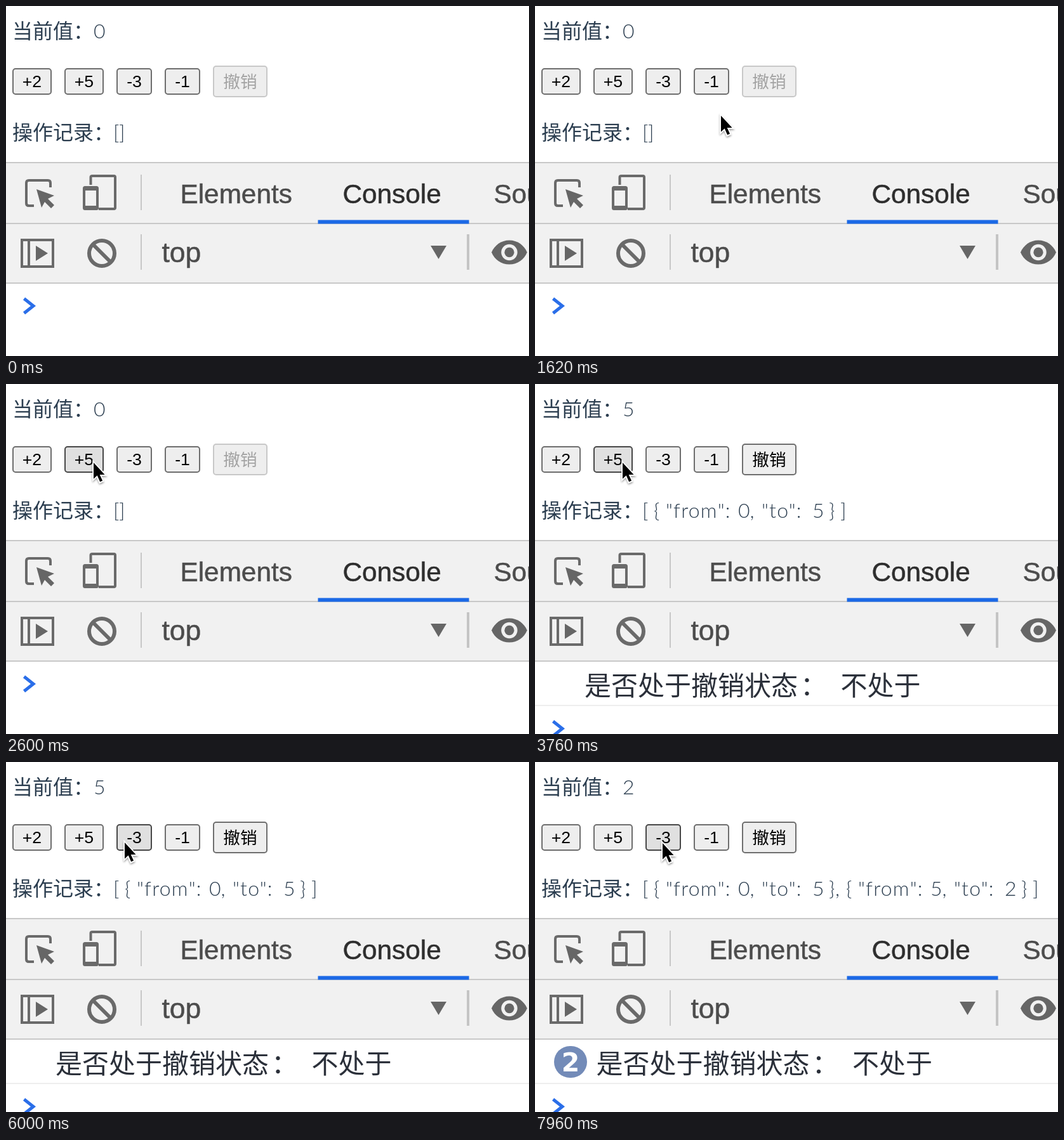
An HTML page for the animation above (8000 ms loop, 824 by 552 pixels).

```html
<!DOCTYPE html>
<html lang="zh-CN">
<head>
<meta charset="utf-8">
<title>Undo demo</title>
<style>
  html, body { margin: 0; width: 100%; height: 100%; overflow: hidden; background: #fff; }
  svg { display: block; width: 100%; height: 100%; }
  text { white-space: pre; }
  .page { font: 300 32px Lato, sans-serif; fill: #2c3e50; }
  .cjk { font: 32px "Noto Sans CJK SC", "Noto Sans CJK", sans-serif; }
  .btn { font: 26.67px "Liberation Sans", "Noto Sans CJK SC", "Noto Sans CJK", sans-serif; text-anchor: middle; }
  .tool { font: 42.3px "Liberation Sans", sans-serif; fill: #4c4c4c; stroke: #4c4c4c; stroke-width: .5; }
  .tool .active { fill: #2e2e2e; stroke: #2e2e2e; }
  .log { font: 42px "Noto Sans CJK SC", "Noto Sans CJK", sans-serif; fill: #2b303a; }
  .badge { font: bold 41px "DejaVu Sans", sans-serif; fill: #fff; text-anchor: middle; }
</style>
</head>
<body>
<svg viewBox="0 0 824 552">
  <defs>
    <filter id="shadow" x="-50%" y="-50%" width="200%" height="200%">
      <feDropShadow dx="0" dy="2" stdDeviation="1.6" flood-opacity=".4"/>
    </filter>
  </defs>
  <rect width="824" height="552" fill="#fff"/>

  <g class="page">
    <text class="cjk" x="10" y="51">当前值：</text>
    <text id="value" x="138" y="51"></text>
    <text class="cjk" x="10" y="211">操作记录：</text>
    <g id="records"></g>
  </g>
  <g id="buttons" class="btn"></g>

  <rect y="246" width="824" height="192" fill="#f1f1f1"/>
  <path d="M0 247H824M0 343H824M0 437H824M213 266V322M213 360V416" stroke="#c8c8c8" stroke-width="2"/>
  <path d="M728 360V416" stroke="#c4c4c4" stroke-width="4"/>
  <rect x="491.500" y="337.500" width="238" height="6" fill="#1b69e6"/>
  <g class="tool">
    <text x="274.500" y="311">Elements</text>
    <text class="active" x="530.500" y="311">Console</text>
    <text x="768.500" y="311">Sources</text>
    <text x="245.500" y="404" style="font-size:44.5px">top</text>
  </g>

  <g fill="none" stroke="#6a6a6a" stroke-width="4">
    <path d="M44 315H36Q32 315 32 311V279Q32 275 36 275H66Q70 275 70 279V286"/>
    <path d="M133.500 282V270Q133.500 268 136 268H170Q172 268 172 270V318Q172 320 170 320H146"/>
    <rect x="123" y="286" width="21" height="34" rx="1.500"/>
    <path d="M123 288H144M123 318H144" stroke-width="6"/>
    <path d="M25 369H74V411H25ZM36 369V411"/>
    <circle cx="151" cy="390" r="20" stroke-width="6"/>
    <path d="M137 376 165 404" stroke-width="6"/>
  </g>
  <g fill="#666">
    <path d="M48 289 76 299 66 304 76 314 71 319 61 309 56 318Z"/>
    <path d="M47 378 66 390 47 402Z"/>
    <path d="M669 378H694L681.500 399Z"/>
    <g transform="translate(793 388.500) scale(2.545)">
      <path d="M0-7.500C-5-7.500-9.270-4.390-11 0-9.270 4.390-5 7.500 0 7.500S9.270 4.390 11 0C9.270-4.390 5-7.500 0-7.500Z"/>
      <circle r="5" fill="#f1f1f1"/>
      <circle r="3"/>
    </g>
  </g>

  <g id="log">
    <path d="M0 507H824" stroke="#eee" stroke-width="2"/>
    <g id="message" class="log">
      <text x="78" y="491">是否处于撤销状态</text>
      <text x="418" y="491">：</text>
      <text x="481.500" y="491">不处于</text>
    </g>
    <g id="badge">
      <rect x="30" y="448" width="52" height="50" rx="25" fill="#738bb8"/>
      <text class="badge" x="56" y="488">2</text>
    </g>
  </g>
  <path id="prompt" d="M28.500 461.500 43 473 28.500 484.500" fill="none" stroke="#2a6ee9" stroke-width="5"/>

  <g id="cursor" filter="url(#shadow)">
    <path id="arrow" transform="translate(1 2) scale(.88)" d="M0 0V29L6.500 23 11.500 34.500 16 32.500 11 21.500H20Z" stroke="#fff" stroke-width="4" paint-order="stroke"/>
    <g id="hand" stroke="#000" stroke-width="2" stroke-linejoin="round" stroke-linecap="round">
      <path fill="#fff" d="M0 5C-1 0 4-1 6 3L10 12C11 9 15 9 16 12 17 9 21 10 21 13 23 11 26 13 26 16L27 23 24 31H11C8 27 3 23-3 19-7 15-2 12 2 15L6 18Z"/>
      <path fill="none" d="M11 20 13 27M16 19 18 27M21 19 22 26"/>
    </g>
  </g>
</svg>
<script>
const LOOP = 8000;
const FIRST = { down: 3460, up: 3760 };
const SECOND = { down: 7220, up: 7680 };
const $ = id => document.getElementById(id);

function add(parent, tag, attrs, text = '') {
  const el = document.createElementNS('http://www.w3.org/2000/svg', tag);
  for (const key in attrs) el.setAttribute(key, attrs[key]);
  el.textContent = text;
  return parent.appendChild(el);
}

const show = (el, on) => el.setAttribute('visibility', on ? 'inherit' : 'hidden');

const buttons = [
  ['+2', 10, 98, 62, 42], ['+5', 92, 98, 62, 42], ['-3', 174, 98, 56, 42],
  ['-1', 250, 98, 56, 42], ['撤销', 326, 94, 86, 50]
].map(([label, x, y, w, h]) => ({
  label, x, y, w, h,
  box: add($('buttons'), 'rect', { x: x + 1, y: y + 1, width: w - 2, height: h - 2, rx: 4, 'stroke-width': 2 }),
  text: add($('buttons'), 'text', { x: x + w / 2, y: label === '撤销' ? 129 : 128 }, label)
}));

// Words of the record list, each with its left edge.
const entry = (from, to, dx) => [
  ['{', 187], ['"from":', 206], [from + ',', 320], ['"to":', 357], [to, 437], ['}', 463]
].map(([word, x]) => [word, x + dx]);

const first = entry('0', '5', 0);
const recordStates = [
  [['[', 169], [']', 178]],
  [['[', 169], ...first, [']', 481]],
  [['[', 169], ...first, [',', 473], ...entry('5', '2', 303), [']', 784]]
].map(words => {
  const group = add($('records'), 'g', {});
  for (const [word, x] of words)
    add(group, 'text', { x, y: 211, 'letter-spacing': word.length > 2 ? 1.2 : 0 }, word);
  return group;
});

// Pointer path: time, x, y.
const path = [
  [780, 788, 294], [920, 640, 255], [1060, 520, 226], [1240, 400, 199], [1520, 307, 178],
  [1600, 307, 178], [1620, 292, 171], [2360, 142, 126], [2440, 142, 126], [2600, 137, 122],
  [4720, 137, 122], [5020, 146, 124], [5540, 174.5, 125], [5860, 182, 125], [5980, 182, 125],
  [6000, 186, 125], [6120, 186, 125], [6380, 200, 126], [LOOP, 200, 126]
];

function pointerAt(t) {
  const i = Math.max(1, path.findIndex(p => p[0] >= t));
  const [t0, x0, y0] = path[i - 1], [t1, x1, y1] = path[i];
  let k = Math.max(0, (t - t0) / (t1 - t0));
  if (t0 === 1620) k = k * k * (3 - 2 * k);
  return { x: x0 + (x1 - x0) * k, y: y0 + (y1 - y0) * k };
}

const inside = (p, b) => p.x >= b.x && p.x <= b.x + b.w && p.y >= b.y && p.y <= b.y + b.h;
const held = (t, click) => t >= click.down && t < click.up;

function buttonColors(disabled, hover, pressed) {
  if (disabled) return ['#eeeeee', '#c8c8c8', '#a3a3a3'];
  if (pressed) return ['#f5f5f5', '#8d8d8d', '#000'];
  return hover ? ['#e0e0e0', '#484848', '#000'] : ['#eeeeee', '#6e6e6e', '#000'];
}

function render(t) {
  const clicks = (t >= FIRST.up) + (t >= SECOND.up);
  const pointer = pointerAt(t);
  const visible = t >= 780;
  const pressed = held(t, FIRST) || held(t, SECOND);

  $('value').textContent = [0, 5, 2][clicks];
  recordStates.forEach((group, i) => show(group, i === clicks));

  for (const b of buttons) {
    const hover = visible && inside(pointer, b);
    const [fill, stroke, ink] = buttonColors(b.label === '撤销' && !clicks, hover, hover && pressed);
    b.box.setAttribute('fill', fill);
    b.box.setAttribute('stroke', stroke);
    b.text.setAttribute('fill', ink);
  }

  show($('log'), clicks > 0);
  show($('badge'), clicks > 1);
  $('message').setAttribute('transform', `translate(${clicks > 1 ? 18.5 : 0})`);
  $('prompt').setAttribute('transform', `translate(0 ${clicks ? 70.5 : 0})`);

  const overTools = pointer.y > 246;
  show($('cursor'), visible);
  show($('hand'), overTools);
  show($('arrow'), !overTools);
  $('cursor').setAttribute('transform', `translate(${pointer.x} ${pointer.y})`);
}

const start = performance.now();
function tick() {
  render((performance.now() - start) % LOOP);
  requestAnimationFrame(tick);
}
tick();
</script>
</body>
</html>
```
